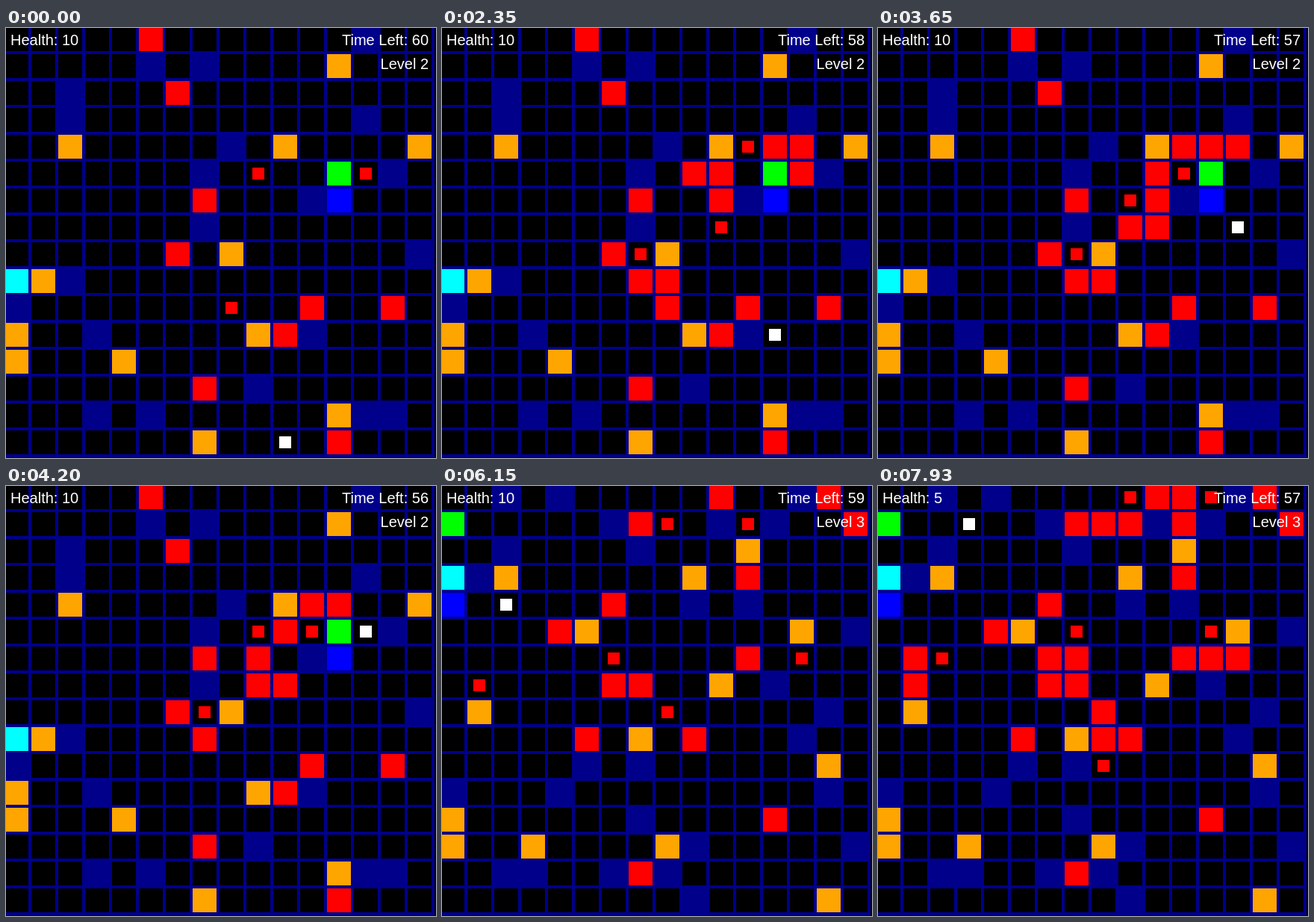
An HTML page with a canvas for the animation above (8000 ms loop, 576 px wide and 576 px high).

```html
<!DOCTYPE html>
<html lang="en">
<head>
<meta charset="utf-8">
<title>Grid maze</title>
<style>
  html, body { margin: 0; width: 100%; height: 100%; overflow: hidden; background: #000; }
  canvas { display: block; }
</style>
</head>
<body>
<canvas id="stage" width="576" height="576"></canvas>
<script>
const ctx = document.getElementById('stage').getContext('2d');
const LOOP = 8000, PITCH = 36, CELLS = 16;
const COLORS = {
  '#': '#00008b', r: '#ff0000', o: '#ffa500', g: '#00ff00', b: '#0000ff', c: '#00ffff'
};
const MOVES = { U: [0, -1], D: [0, 1], L: [-1, 0], R: [1, 0], '.': [0, 0] };

const levels = [
  {
    number: 2, start: 0,
    map: [
      '.....r.......#..', '.....#.#....o...', '..#...r.........', '..#..........#..',
      '..o.....#.o....o', '.......#....g.#.', '.......r...#b...', '.......#........',
      '......r.o......#', 'co#.............', '#..........r..r.', 'o..#.....or#....',
      'o...o...........', '.......r.#......', '...#.#......o##.', '.......o....r...'
    ],
    ticks: [810, 1740, 2690, 3710],
    hits: [],
    player: {
      x: 10, y: 15, path: 'UUURRUUUURUUU',
      times: [1250, 1500, 1680, 1920, 2170, 2350, 2600, 2780, 3150, 3400, 3650, 3890, 4200]
    },
    enemyTimes: [1500, 1920, 2350, 2780, 3400, 3890],
    enemies: [
      { x: 9, y: 5, path: 'RDDLUU' },
      { x: 13, y: 5, path: 'ULLD..' },
      { x: 8, y: 10, path: 'ULU...' }
    ],
    fades: [
      { time: 2780, cells: ['9,5', '13,5', '8,10'] },
      { time: 3890, cells: ['10,6', '13,4', '8,9'] }
    ]
  },
  {
    number: 3, start: 4560,
    map: [
      '..#.#.....r..#r.', 'g.....#r..#.#..r', '..#....#...o....', 'c#o......o.r....',
      'b.....r..#.#....', '....ro.......o.#', '...........r....', '......rr..o.#...',
      '.o............#.', '.....r.o.r...#..', '.....#.#......o.', '#...#.........#.',
      'o......#....r...', 'o..o....o#.....#', '..##..#r#.......', '.........#....o.'
    ],
    ticks: [5430, 6450, 7440],
    hits: [6480],
    player: { x: 2, y: 5, path: 'UURUU', times: [6150, 6480, 7500, 7750, 7930] },
    enemyTimes: [6480, 7750],
    enemies: [
      { x: 8, y: 1, path: 'RU' },
      { x: 11, y: 1, path: 'UR' },
      { x: 6, y: 6, path: 'RU' },
      { x: 13, y: 6, path: 'LU' },
      { x: 1, y: 7, path: 'UR' },
      { x: 8, y: 8, path: 'DD' }
    ],
    fades: []
  }
];

const countPast = (times, t) => times.filter(time => time <= t).length;

// Every cell the mover has been on, the current one last.
function route({ x, y, path }, steps) {
  const cells = [[x, y]];
  for (const step of path.slice(0, steps)) {
    const [dx, dy] = MOVES[step];
    cells.push([x += dx, y += dy]);
  }
  return cells;
}

function square([col, row], size, color) {
  ctx.fillStyle = color;
  ctx.fillRect(14 + col * PITCH - size / 2, 15 + row * PITCH - size / 2, size, size);
}

function drawGrid() {
  ctx.fillStyle = '#000';
  ctx.fillRect(0, 0, 576, 576);
  ctx.fillStyle = COLORS['#'];
  for (let i = 0; i < CELLS; i++) {
    ctx.fillRect(30 + i * PITCH, 0, 4, 575);
    ctx.fillRect(0, 31 + i * PITCH, 574, 4);
  }
}

function drawEnemies(level, t) {
  const faded = level.fades.filter(f => f.time <= t).flatMap(f => f.cells);
  const steps = countPast(level.enemyTimes, t);
  for (const enemy of level.enemies) {
    const cells = route(enemy, steps);
    const head = cells.pop();
    for (const cell of cells) {
      if (!faded.includes(String(cell))) square(cell, 32, COLORS.r);
    }
    square(head, 32, '#000');
    square(head, 16, COLORS.r);
  }
}

function drawText(level, t) {
  ctx.fillStyle = '#fff';
  ctx.font = '20px "Liberation Sans", Arial, sans-serif';
  ctx.textAlign = 'left';
  ctx.fillText(`Health: ${10 - 5 * countPast(level.hits, t)}`, 6, 23);
  ctx.textAlign = 'right';
  ctx.fillText(`Time Left: ${60 - countPast(level.ticks, t)}`, 566, 23);
  ctx.fillText(`Level ${level.number}`, 566, 55);
}

function draw(t) {
  const level = levels.filter(l => l.start <= t).pop();
  drawGrid();
  level.map.forEach((line, row) => [...line].forEach((tile, col) => {
    if (tile !== '.') square([col, row], 32, COLORS[tile]);
  }));
  drawEnemies(level, t);
  const { player } = level;
  square(route(player, countPast(player.times, t)).pop(), 16, '#fff');
  drawText(level, t);
}

const began = performance.now();
function frame() {
  draw((performance.now() - began) % LOOP);
  requestAnimationFrame(frame);
}
frame();
</script>
</body>
</html>
```
